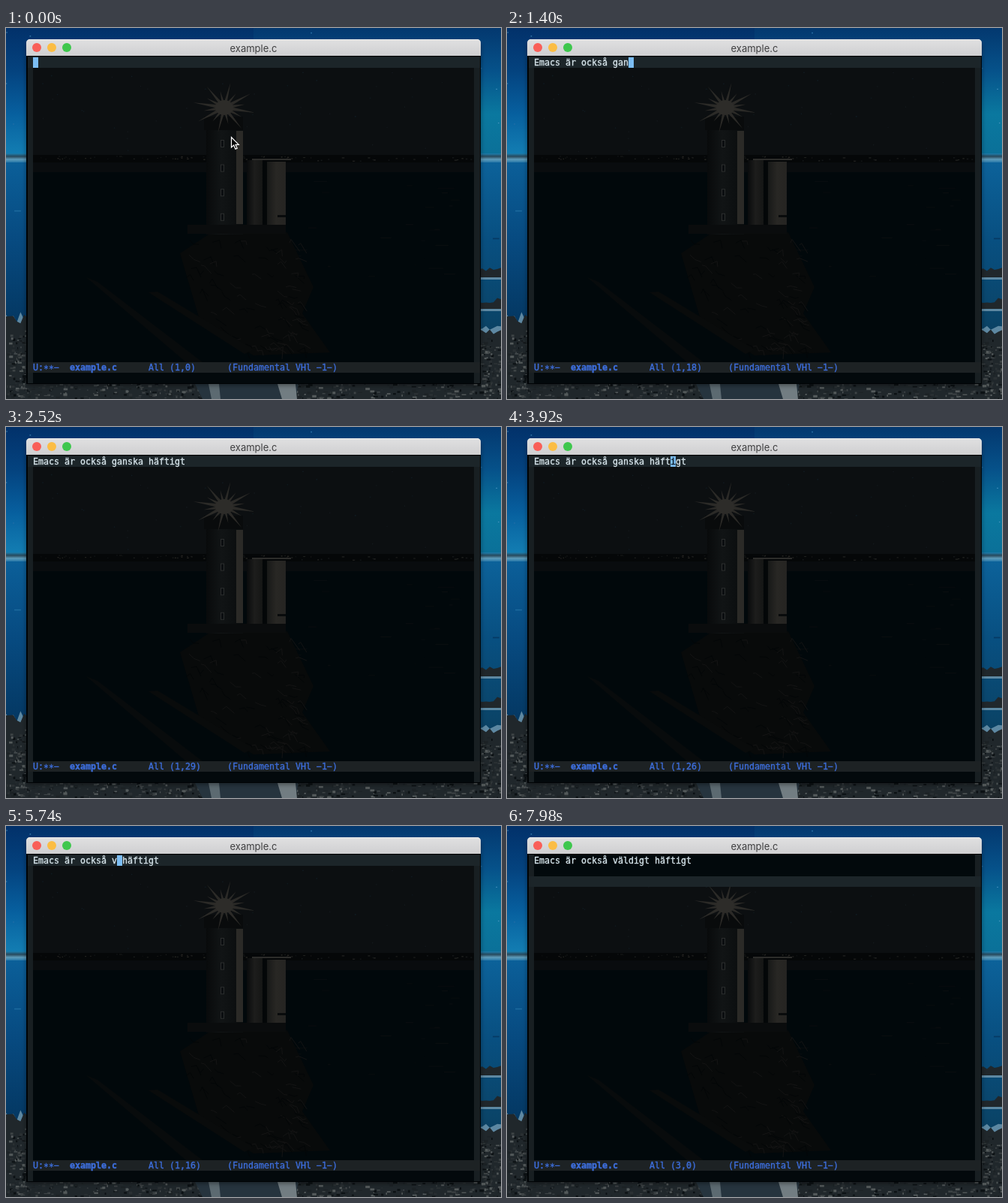
These frames come from a looping animation (660x494 px, 8 s). An HTML page with a canvas:

```html
<!DOCTYPE html>
<html lang="sv">
<head>
<meta charset="utf-8">
<title>example.c</title>
<style>
html, body { margin: 0; width: 100%; height: 100%; overflow: hidden; background: #02346e; }
#stage { position: absolute; left: 0; top: 0; width: 660px; height: 494px; overflow: hidden; }
#stage > * { position: absolute; }
canvas { left: 0; top: 0; }
#bar {
  left: 27px; top: 15px; width: 606px; height: 22px; border-radius: 5px 5px 0 0;
  background: linear-gradient(#e0e0e1, #cfcfd1); box-shadow: inset 0 1px #ececec;
  font: 13px/24px Inter, sans-serif; color: #3f3f40; text-align: center;
}
#bar i { position: absolute; top: 5px; width: 12px; height: 12px; border-radius: 50%; }
.mono {
  font: 11.63px/14px "DejaVu Sans Mono", monospace; white-space: pre; height: 14px;
  -webkit-text-stroke: .35px currentColor;
}
#hl { left: 29px; width: 603px; height: 14px; background: #1c2529; }
#past { left: 36px; top: 38px; width: 588px; height: 29px; background: #02090c; }
#line { left: 36px; top: 39px; color: #d6e4ea; }
#cursor { width: 7px; background: #7cbdf3; color: #0a1a24; }
#mode { left: 36px; top: 445px; color: #3d6edc; }
#mode span { position: relative; top: 2px; }
#mouse { left: 299px; top: 144px; }
</style>
</head>
<body>
<div id="stage">
  <canvas id="scene" width="660" height="494"></canvas>
  <div id="bar">example.c
    <i style="left:8px;background:#f95f58"></i>
    <i style="left:28px;background:#fbbd44"></i>
    <i style="left:48px;background:#3ec74d"></i>
  </div>
  <div id="past"></div>
  <div id="hl"></div>
  <div id="line" class="mono"></div>
  <div id="cursor" class="mono"></div>
  <div id="mode" class="mono">U:<span>**</span>−  <b>example.c</b>      <a id="pos"></a>(Fundamental VHl −1−)</div>
  <svg id="mouse" width="14" height="20"><path d="M1.5 1.5V15l3.2-2.9 2.2 5 2.3-1-2.2-4.8h4.3Z" fill="#000" stroke="#fff" stroke-width="1.2"/></svg>
</div>
<script>
const $ = id => document.getElementById(id);
const g = $('scene').getContext('2d');

let seed = 11;
const rnd = (a = 0, b = 1) => {
  seed = (seed * 16807) % 2147483647;
  return a + (b - a) * seed / 2147483647;
};
const box = (color, x, y, w, h) => { g.fillStyle = color; g.fillRect(x, y, w, h); };
const poly = (color, ...p) => {
  g.fillStyle = color;
  g.beginPath();
  for (let i = 0; i < p.length; i += 2) g.lineTo(p[i], p[i + 1]);
  g.fill();
};
const shade = (x0, y0, x1, y1, ...stops) => {
  const f = g.createLinearGradient(x0, y0, x1, y1);
  stops.forEach((c, i) => f.addColorStop(i / (stops.length - 1), c));
  return f;
};
const specks = (n, colors, x, y, w, h, size, flat = 1) => {
  for (let i = 0; i < n; i++)
    box(colors[i % colors.length], x + rnd(0, w), y + rnd(0, h), rnd(1, size), rnd(1, size * flat));
};
// uneven ridge from x to x + w, filled down to the given bottom
const ridge = (color, x, w, y, bump, bottom) => {
  const p = [x, bottom];
  for (let i = 0; i <= 6; i++) p.push(x + w * i / 6, y - rnd(0, bump));
  poly(color, ...p, x + w, bottom);
};

function desktop() {
  const left = [0, 330], right = [330, 330];
  const fill = (side, y, h, ...c) => box(shade(0, y, 0, y + h, ...c), side[0], y, side[1], h);
  fill(left, 0, 172, '#02316a', '#04437f', '#07609f', '#1480b4');
  fill(right, 0, 172, '#03386f', '#06528a', '#0a789f', '#0b7098');
  fill(left, 178, 316, '#0b5f99', '#074a80', '#043863', '#04233d');
  fill(right, 178, 316, '#0c629a', '#084f80', '#0a4468', '#0b2c42');
  box(shade(0, 167, 0, 179, '#1c7fae', '#27495c', '#5f9dbb', '#2677a8'), 0, 167, 660, 12);
  specks(45, ['#4a93c0', '#2c72a8'], 0, 2, 660, 160, 1.7);
  specks(40, ['#1d6a9e', '#063a64'], 0, 184, 660, 180, 9, .2);

  // shore
  const stone = ['#3d4345', '#0c1114', '#53595a', '#1c2225', '#2a3033'];
  const shore = '#20272b', foam = '#5d88a2';
  for (const y of [326, 368]) {
    ridge(foam, 630, 30, y + 2, 4, y + 9);
    ridge(shore, 630, 30, y - 2, 7, y + 6);
  }
  ridge(foam, 0, 29, 392, 14, 404);
  ridge(shore, 0, 29, 398, 18, 494);
  ridge(foam, 630, 30, 402, 6, 410);
  ridge(shore, 630, 30, 408, 8, 494);
  box(shore, 0, 473, 660, 21);
  specks(110, stone, 0, 402, 27, 90, 6, .6);
  specks(110, stone, 632, 412, 28, 80, 6, .6);
  specks(420, stone, 0, 473, 660, 20, 6, .6);
  poly('#26343e', 252, 474, 390, 474, 386, 494, 262, 494);
  poly('#5c6a71', 270, 474, 284, 474, 286, 494, 274, 494);
  poly('#727d82', 362, 474, 386, 474, 388, 494, 368, 494);
}

function rockMass() {
  poly('#080a0a', 232, 300, 270, 275, 375, 272, 410, 345, 395, 380, 432, 432, 330, 436, 260, 395);
  g.lineWidth = 1;
  for (let i = 0; i < 90; i++) {
    const y = rnd(282, 430), x = rnd(238 + Math.max(0, y - 350) * .9, 396);
    g.strokeStyle = i % 2 ? '#141414' : '#030607';
    g.beginPath();
    g.moveTo(x, y);
    g.lineTo(x + rnd(2, 10), y + rnd(-6, 8));
    g.lineTo(x + rnd(8, 16), y + rnd(0, 12));
    g.stroke();
  }
  poly('#080b0c', 107, 332, 122, 338, 262, 445, 240, 445);
  poly('#090b0b', 190, 352, 202, 351, 330, 428, 318, 434);
}

function lighthouse() {
  box(shade(267, 0, 306, 0, '#080a0b', '#111415', '#0c0f10'), 267, 130, 49, 145);
  box('#090b0c', 264, 118, 52, 18);
  box('#2b2a27', 307, 137, 9, 124);
  for (let y = 149; y < 250; y += 32.6) {
    box('#2b2d2d', 286, y, 5, 10);
    box('#0b0e10', 287, y + 1, 3, 8);
  }
  box(shade(321, 0, 342, 0, '#090b0c', '#1d1d1c', '#151615'), 321, 176, 21, 90);
  box('#040708', 342, 178, 6, 90);
  box(shade(348, 0, 373, 0, '#181918', '#282724', '#252422'), 348, 178, 25, 92);
  box('#2c2c2a', 328, 174, 52, 2);
  box('#090b0c', 362, 249, 11, 3);
  box('#0a0c0d', 242, 262, 131, 12);

  // lamp
  for (let i = 0; i < 16; i++) {
    const a = i * Math.PI / 8 + .2, r = i % 2 ? 28 : 42;
    const dx = Math.cos(a), dy = Math.sin(a) * .8;
    poly('#2b2a27', 291 - dy * 3, 106 + dx * 3, 291 + dx * r, 106 + dy * r, 291 + dy * 3, 106 - dx * 3);
  }
  g.fillStyle = '#2d2c29';
  g.beginPath();
  g.ellipse(291, 106, 12, 10, 0, 0, 7);
  g.fill();
}

function windowBody() {
  g.save();
  g.shadowColor = 'rgba(0,0,0,.4)';
  g.shadowBlur = 6;
  g.shadowOffsetY = 2;
  box('#000305', 27, 20, 606, 454);
  g.restore();
  box('#181f22', 29, 38, 603, 435);
  box('#0c0f11', 36, 53, 588, 117);
  box('#050708', 36, 169, 588, 10);
  box('#090c0e', 36, 179, 588, 13);
  box('#01080b', 36, 192, 588, 253);
  box('#03090c', 36, 459, 588, 14);
  specks(45, ['#14191d', '#111d24'], 40, 56, 580, 109, 1.6);
  specks(60, ['#1b1c1b', '#2c2b27', '#101314'], 40, 170, 350, 5, 2.4, .6);
  specks(26, ['#151819', '#20211f'], 390, 172, 230, 5, 4, .4);
  specks(24, ['#090d0f', '#070b0d'], 370, 200, 230, 130, 24, .06);
  rockMass();
  lighthouse();
  box('#1d2224', 29, 445, 603, 14);
}

desktop();
windowBody();

const STEP = 140, BLINK = 245;
const stem = 'Emacs är också ';
const oldWord = 'ganska', newWord = 'väldigt', tail = ' häftigt';

// text before and after the cursor, its row, and the time of the last key press
function stateAt(t) {
  const k = t / STEP;
  const first = stem + oldWord + tail;
  const at = (text, col, key = t, row = 1) => ({ text, col, key, row });

  if (k < 26) {
    const col = Math.max(0, Math.min(first.length, 2 * k - 2));
    return at(first.slice(0, col), col, Math.min(t, 2200));
  }
  if (k < 35) return at(first, Math.max(21, 54 - k));
  if (k < 46) {
    const word = k < 41 ? oldWord.slice(0, 40 - k) : newWord.slice(0, 2 * (k - 41) + 1);
    const head = stem + word;
    return at(head + tail, head.length);
  }
  const text = stem + newWord + tail;
  return k < 49 ? at(text, text.length, 6430) : at(text, 0, 6720, 3);
}

function show(t) {
  const { text, col, key, row } = stateAt(t);
  const top = 39 + 14 * (row - 1) + 'px';
  const visible = (id, on) => { $(id).style.display = on ? '' : 'none'; };
  const cursor = $('cursor');
  cursor.style.left = 36 + 7 * col + 'px';
  cursor.style.top = $('hl').style.top = top;
  cursor.textContent = row === 1 ? text[col] || '' : '';
  $('line').textContent = text;
  $('pos').textContent = `All (${row},${col})`.padEnd(15);
  visible('cursor', Math.floor((t - key) / BLINK) % 2 < 1);
  visible('past', row > 1);
  visible('mouse', t < STEP);
}

const start = performance.now();
let last = -1;
function tick() {
  const t = Math.floor((performance.now() - start) % 8000 / STEP) * STEP;
  if (t !== last) show(last = t);
  requestAnimationFrame(tick);
}
tick();
</script>
</body>
</html>
```
